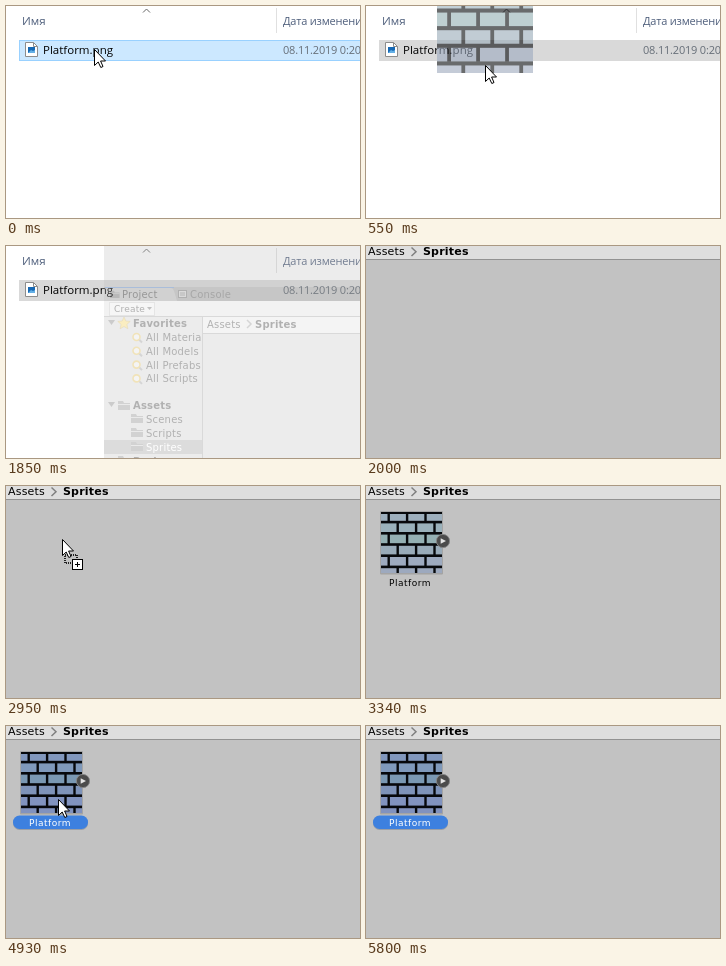
An HTML page that plays this animation: 354x212 px, repeating every 6.21 s.

```html
<!DOCTYPE html>
<html lang="ru">
<head>
<meta charset="utf-8">
<title>Drag a sprite into the project</title>
<style>
  html, body { margin: 0; width: 100%; height: 100%; overflow: hidden; background: #fff; }
  svg { display: block; }
  text { white-space: pre; }
  .win { font: 11.5px "Open Sans", "Noto Sans", sans-serif; }
  .date { font-size: 11px; letter-spacing: -.2px; }
  .ui { font: 11px "DejaVu Sans", sans-serif; letter-spacing: .2px; }
  .small { font-size: 10px; }
  .label { font-size: 9px; letter-spacing: .5px; }
  .b { font-weight: bold; }
  #thumb { isolation: isolate; }
  #tint { mix-blend-mode: multiply; }
</style>
</head>
<body>
<svg id="stage" width="354" height="212" viewBox="0 0 354 212">
  <defs>
    <clipPath id="tile"><rect width="61" height="61"/></clipPath>
    <clipPath id="tree"><rect x="98" y="71" width="98" height="141"/></clipPath>
    <path id="arrow" d="M.5 .5V16.5L4.2 13L6.8 18.5L9 17.5L6.6 12H11.5Z" fill="#fff" stroke="#000" stroke-linejoin="miter"/>
    <g id="folder"><path d="M0 1h5l1 2h6v7H0Z" fill="#6d6d6d"/><path d="M0 4.5h12" stroke="#bbb"/></g>
    <g id="lens"><path d="M4 4l4 4" stroke="#777" stroke-width="2"/><circle cx="2.5" cy="2.5" r="3.5" fill="#ddd" stroke="#d2a51c" stroke-width="1.6"/></g>
    <g id="bricks" clip-path="url(#tile)"></g>
  </defs>

  <g id="explorer" class="win">
    <rect width="354" height="212" fill="#fff"/>
    <path d="M137 6.5L140.5 3L144 6.5" fill="none" stroke="#666"/>
    <path d="M270.5 2V27" stroke="#e0e0e0"/>
    <g fill="#4f5f7c"><text x="16" y="19">Имя</text><text x="277" y="19" class="date">Дата изменения</text></g>
    <rect id="row" x="13.5" y="34.5" width="350" height="20"/>
    <path d="M19.5 36.5h8l4 4v10h-12Z" fill="#fff" stroke="#8c8c8c"/>
    <path d="M27.5 36.5v4h4" fill="none" stroke="#8c8c8c"/>
    <rect x="22" y="41" width="7" height="6" fill="#1769b5"/>
    <path d="M22 47l3-3 2 1 2-1v3Z" fill="#64b0e6"/>
    <text x="37" y="48">Platform.png</text>
    <text x="277" y="48" class="date" fill="#666e78">08.11.2019 0:20</text>
  </g>

  <g id="panel" class="ui small" opacity=".3">
    <rect x="98" width="256" height="212" fill="#c2c2c2"/>
    <rect x="98" y="41" width="256" height="14" fill="#9c9c9c"/>
    <path d="M98 55V44q0-2 2-2h65q2 0 3 3l3 10Z" fill="#c2c2c2"/>
    <path d="M99 41.5H168" stroke="#3d80df"/>
    <rect x="98" y="55" width="256" height="15" fill="#d6d6d6"/>
    <path d="M98 70.5H354M196 87.5H354M196.5 71V212" stroke="#858585"/>
    <rect x="197" y="71" width="157" height="16" fill="#dedede"/>
    <use href="#folder" transform="translate(104 44) scale(.8)"/>
    <text x="116" y="52">Project</text>
    <rect x="172.5" y="44.5" width="8" height="7" fill="#ddd" stroke="#555"/>
    <path d="M174 47h5M174 49h5" stroke="#666"/>
    <text x="184" y="52" fill="#333">Console</text>
    <rect x="103.5" y="56.5" width="45" height="13" fill="#e2e2e2" stroke="#aaa"/>
    <text x="108" y="66" style="font-size:9px">Create</text>
    <path d="M141 61h5l-2.5 3Z" fill="#333"/>
    <text x="201" y="82">Assets</text>
    <path d="M241 74l4 4-4 4" fill="none" stroke="#777" stroke-width="1.5"/>
    <text x="249" y="82" class="b">Sprites</text>
    <g id="treeRows" clip-path="url(#tree)"></g>
  </g>

  <g id="editor" class="ui">
    <rect width="354" height="212" fill="#c2c2c2"/>
    <rect width="354" height="13" fill="#dedede"/>
    <path d="M0 13.5H354" stroke="#929292"/>
    <text x="2" y="9">Assets</text>
    <path d="M45.5 1.5L50 5.8L45.5 10" fill="none" stroke="#808080" stroke-width="1.5"/>
    <text x="57" y="9" class="b">Sprites</text>
    <g id="thumb">
      <rect x="14" y="25" width="63" height="63.5" rx="1" fill="#a4a4a4"/>
      <use href="#bricks" x="15" y="26"/>
      <rect id="tint" x="15" y="26" width="61" height="61" fill="#d2dcff"/>
    </g>
    <g id="name">
      <g id="pill">
        <rect x="7" y="90.5" width="75" height="13.5" rx="6.5" fill="#9b9fa6"/>
        <rect x="7" y="89.5" width="75" height="13.5" rx="6.5" fill="#3d80df"/>
      </g>
      <text id="caption" x="23" y="100" class="label">Platform</text>
      <circle cx="77" cy="55" r="6.6" fill="#4b4b4b" stroke="#858585"/>
      <path d="M74.7 52.3L80 55L74.7 57.7Z" fill="#e4e4e4"/>
    </g>
  </g>

  <g id="cursor">
    <use id="ghost" href="#bricks" transform="translate(-48 -88) scale(1.574)" opacity=".6"/>
    <g id="copy">
      <rect x="3" y="16" width="12" height="8" fill="none" stroke="#222" stroke-width="2" stroke-dasharray="1 1"/>
      <rect x="10.5" y="20.5" width="10" height="10" fill="#fff" stroke="#000"/>
      <path d="M13 25.5h5M15.5 23v5" stroke="#000"/>
    </g>
    <use href="#arrow"/>
  </g>
</svg>
<script>
const $ = id => document.getElementById(id);
const show = (id, on) => { $(id).style.display = on ? '' : 'none'; };

function buildBricks() {
  const tones = ['#9dafbd', '#9ab1bb', '#94b0b3', '#99abb9', '#9daabf', '#9da9be'];
  let out = '<rect width="61" height="61" fill="#07090c"/>';
  tones.forEach((tone, r) => {
    const y = 0.2 + r * 11.2;
    for (let c = 0; c < 5; c++) {
      const x = (r % 2 ? -0.5 : -9.5) + c * 18.4;
      out += `<rect x="${x}" y="${y}" width="16" height="8.6" fill="${tone}"/>`;
    }
  });
  $('bricks').innerHTML = out + '<rect width="61" height="2" fill="#07090c"/>';
}

function buildTree() {
  const head = (name, y) =>
    `<path d="M102 ${y - 7}h7l-3.5 5Z" fill="#555"/><text x="127" y="${y}" class="b">${name}</text>`;
  const item = (name, y, icon, x, dy, fill = '#000') =>
    `<use href="#${icon}" x="${x}" y="${y - dy}"/><text x="140" y="${y}" fill="${fill}">${name}</text>`;
  let out = '<rect x="98" y="194" width="98" height="14" fill="#8f8f8f"/>';
  out += head('Favorites', 81) +
    '<path d="M118 71l1.8 4 4.4.4-3.3 3 1 4.4-3.9-2.3-3.9 2.3 1-4.4-3.3-3 4.4-.4Z" fill="#f0c431" stroke="#a98518" stroke-width=".6"/>';
  ['Materials', 'Models', 'Prefabs', 'Scripts'].forEach((n, i) => {
    out += item('All ' + n, 95 + i * 13.8, 'lens', 128, 6.5);
  });
  out += head('Assets', 163) + '<use href="#folder" x="112" y="154"/>';
  ['Scenes', 'Scripts', 'Sprites'].forEach((n, i) => {
    out += item(n, 177 + i * 14, 'folder', 125, 10, n === 'Sprites' ? '#fff' : '#000');
  });
  out += head('Packages', 219) + '<use href="#folder" x="112" y="209"/>';
  $('treeRows').innerHTML = out;
}

// time, x, y, mode; no position means hidden
const path = [
  [0, 88, 43, 'plain'], [120, 81, 44, 'plain'], [240, 73, 42, 'plain'],
  [550, 119, 59, 'ghost'], [700, 300, 113, 'ghost'], [820],
  [2280, 235, 156, 'copy'], [2400, 170, 104, 'copy'], [2520, 112, 62, 'copy'],
  [2670, 33, 52, 'copy'], [2950, 56, 53, 'copy'], [3070, 61, 46, 'copy'], [3190],
  [4150, 73, 53, 'plain'], [4270, 60, 54, 'plain'], [4420, 83, 60, 'plain'],
  [4540, 70, 77, 'plain'], [4660, 51, 75, 'plain'], [4810, 52, 73, 'plain'],
  [5080, 64, 64, 'plain'], [5230, 80, 60, 'plain'], [5380, 115, 64, 'plain'],
  [5530, 195, 108, 'plain'], [5650, 325, 174, 'plain'], [5800]
];
const LOOP = 6210;

function draw(t) {
  const held = t >= 550, picked = t >= 4810;
  show('explorer', t < 2000);
  show('panel', t >= 1850 && t < 2000);
  show('editor', t >= 2000);
  $('row').setAttribute('fill', held ? '#d9d9d9' : '#cce8ff');
  $('row').setAttribute('stroke', held ? '#d9d9d9' : '#99d1ff');
  show('name', t >= 3190);
  show('thumb', t >= 3340);
  show('tint', picked);
  show('pill', picked);
  $('caption').setAttribute('fill', picked ? '#fff' : '#000');

  const [, x, y, mode] = path.findLast(p => p[0] <= t);
  show('cursor', !!mode);
  show('ghost', mode === 'ghost');
  show('copy', mode === 'copy');
  if (mode) $('cursor').setAttribute('transform', `translate(${x} ${y})`);
}

buildBricks();
buildTree();
const start = performance.now();
function tick() {
  draw((performance.now() - start) % LOOP);
  requestAnimationFrame(tick);
}
tick();
</script>
</body>
</html>
```
